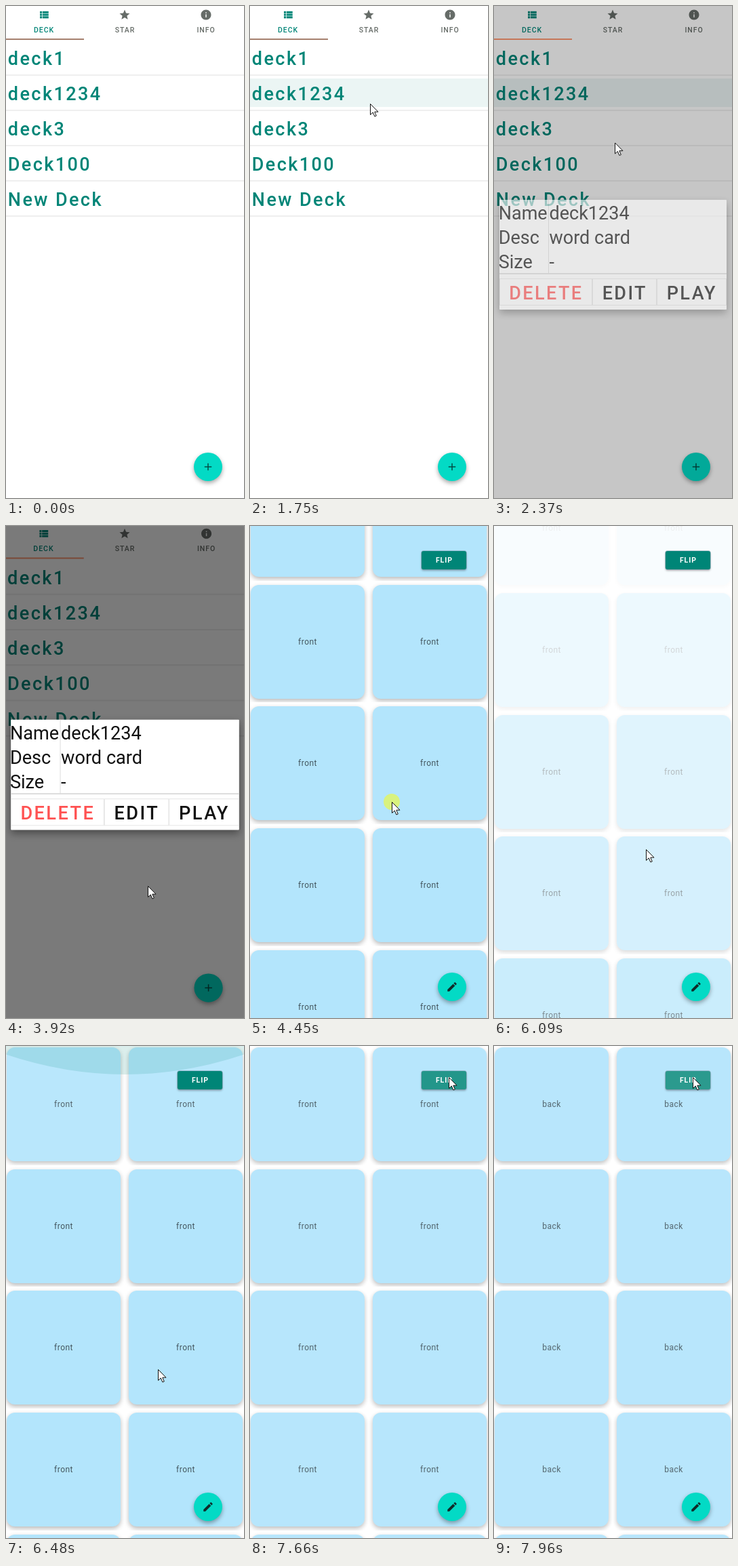
An HTML page for the animation above (8000 ms loop, 351 px wide and 726 px high).

```html
<!DOCTYPE html>
<html>
<head>
<meta charset="utf-8">
<style>
html, body { margin: 0; width: 100%; height: 100%; overflow: hidden; background: #fff; }
body { position: relative; font-family: Roboto, sans-serif; }
div, svg, span { position: absolute; white-space: nowrap; }
.page, .dim { left: 0; top: 0; width: 351px; height: 726px; background: #fff; overflow: hidden; }
.tab { top: 0; width: 120px; height: 50px; color: #666c68; }
.tab.on { color: #008577; }
.tab svg { left: 51px; top: 4px; width: 18px; height: 18px; fill: currentColor; }
.tab span { left: 0; width: 121px; top: 28px; text-align: center; font: 500 10.5px/15px Roboto, sans-serif; letter-spacing: .94px; }
.big { font: 500 27px/52px Roboto, sans-serif; letter-spacing: 2.41px; }
.deck { left: 0; width: 351px; height: 52px; color: #008577; text-indent: 2.8px; }
.deck::after { content: ""; position: absolute; left: 0; top: 49px; width: 100%; height: 1.5px; background: #efefef; }
#press { left: 0; top: 107px; width: 351px; height: 42px; background: #008577; }
#line { left: 0; top: 48.3px; width: 115px; height: 1.5px; }
.fab { left: 276.7px; top: 658.7px; width: 42px; height: 42px; border-radius: 50%; background: #03dac5; box-shadow: 0 3px 6px rgba(0,0,0,.35); }
.fab svg { left: 12px; top: 12px; width: 18px; height: 18px; }
.dim { background: #000; }
#dialog { left: 7.5px; top: 285.5px; width: 335px; height: 162px; background: #fff; border-radius: 1px; box-shadow: 0 5px 12px rgba(0,0,0,.4); }
#dialog .label { font: 27px/36.3px Roboto, sans-serif; color: #111; }
.rule { background: #dcdcdc; }
.btn { top: 116px; height: 40px; border: 1px solid #e6e6e6; box-sizing: border-box; line-height: 42px !important; text-indent: 13.7px; overflow: hidden; color: #111; }
#ripple { left: 47px; top: 20px; width: 0; height: 0; border-radius: 50%; background: #000; }
.cell { width: 180px; height: 179.67px; overflow: hidden; }
.card { left: 6px; top: 6px; width: 168px; height: 168px; border-radius: 12px; background: #b3e5fc; box-shadow: 0 3px 7px rgba(0,0,0,.28); }
.card span { left: 0; width: 100%; text-align: center; font: 12px/168px Roboto, sans-serif; letter-spacing: .45px; color: rgba(0,0,0,.63); }
#flip { left: 253px; top: 37px; width: 66px; height: 27px; border-radius: 3px; background: #008577; color: #fff; text-align: center; text-indent: .9px; font: 700 10.5px/27px Roboto, sans-serif; letter-spacing: .94px; box-shadow: 0 0 0 .8px rgba(120,150,165,.7), 0 2px 3px rgba(0,0,0,.3); overflow: hidden; }
#flash { left: 0; top: 0; width: 100%; height: 100%; background: #fff; }
#glow { left: 0; top: 0; }
#halo { left: -12px; top: -12px; width: 24px; height: 24px; border-radius: 50%; background: rgba(255,255,0,.5); }
#cursor { left: 0; top: 0; }
</style>
</head>
<body>
<div class="page" id="list">
  <div id="press"></div>
  <div id="line"></div>
  <div class="fab"><svg viewBox="0 0 24 24" fill="#044f47"><path d="M19 13h-6v6h-2v-6H5v-2h6V5h2v6h6v2z"/></svg></div>
</div>
<div class="dim" id="dim"></div>
<div class="page" id="popup" style="background:none">
  <div id="dialog">
    <div class="rule" style="left:72px;top:0;width:1.5px;height:109px"></div>
    <div class="rule" style="left:0;top:108.5px;width:335px;height:1.5px"></div>
    <div class="btn big" style="left:0;width:137.5px;color:#ff5252">DELETE</div>
    <div class="btn big" style="left:137.5px;width:95px">EDIT<div id="ripple"></div></div>
    <div class="btn big" style="left:232.5px;width:102.5px">PLAY</div>
  </div>
</div>
<div class="page" id="cards">
  <div id="grid"></div>
  <svg id="glow" width="351" height="726"><path fill="#008577" fill-opacity=".14"/></svg>
  <div id="flip">FLIP<div id="flash"></div></div>
  <div class="fab"><svg viewBox="0 0 24 24" fill="#102c2a"><path d="M3 17.25V21h3.75L17.81 9.94l-3.75-3.75L3 17.25zM20.71 7.04c.39-.39.39-1.02 0-1.41l-2.34-2.34c-.39-.39-1.02-.39-1.41 0l-1.83 1.83 3.75 3.75 1.83-1.83z"/></svg></div>
</div>
<div id="cursor">
  <div id="halo"></div>
  <svg width="14" height="22"><path d="M.5 .5V16.5L4.3 13L6.9 19L9.3 18L6.8 12.2H12Z" fill="#fff" stroke="#111"/></svg>
</div>
<script>
const LOOP = 8000, PITCH = 179.67, ROWS = 16, FADE = 350;
const $ = id => document.getElementById(id);
const add = (parent, html) => parent.insertAdjacentHTML('beforeend', html);
const ramp = (t, a, b) => Math.min(1, Math.max(0, (t - a) / (b - a)));

// Interpolates rows of [time, ...values].
function track(keys, t) {
  let i = 0;
  while (i < keys.length - 2 && t >= keys[i + 1][0]) i++;
  const a = keys[i], b = keys[i + 1], p = ramp(t, a[0], b[0]);
  return a.slice(1).map((v, j) => v + (b[j + 1] - v) * p);
}

const tabs = [
  ['DECK', 'M4 14h4v-4H4v4zm0 5h4v-4H4v4zM4 9h4V5H4v4zm5 5h12v-4H9v4zm0 5h12v-4H9v4zM9 5v4h12V5H9z'],
  ['STAR', 'M12 17.27L18.18 21l-1.64-7.03L22 9.24l-7.19-.61L12 2 9.19 8.63 2 9.24l5.46 4.73L5.82 21z'],
  ['INFO', 'M12 2C6.48 2 2 6.48 2 12s4.48 10 10 10 10-4.48 10-10S17.52 2 12 2zm1 15h-2v-6h2v6zm0-8h-2V7h2v2z']
];
tabs.forEach(([name, d], i) => add($('list'),
  `<div class="tab ${i ? '' : 'on'}" style="left:${-4.5 + 119.5 * i}px"><svg viewBox="0 0 24 24"><path d="${d}"/></svg><span>${name}</span></div>`));
['deck1', 'deck1234', 'deck3', 'Deck100', 'New Deck'].forEach((name, i) =>
  add($('list'), `<div class="deck big" style="top:${52 + 52 * i}px">${name}</div>`));
[['Name', 'deck1234'], ['Desc', 'word card'], ['Size', '-']].forEach((pair, i) =>
  pair.forEach((s, j) => add($('dialog'),
    `<div class="label" style="left:${j ? 74 : -.8}px;top:${2 + 36.3 * i}px">${s}</div>`)));
for (let i = 0; i < ROWS * 2; i++)
  add($('grid'), `<div class="cell" style="left:${i % 2 ? 175 : -5}px;top:${-4 + PITCH * (i >> 1)}px">
    <div class="card"><span class="front">front</span><span class="back">back</span></div></div>`);
const cards = [...document.querySelectorAll('.card')];

const END = PITCH * 11 + 157.7;
const scrollKeys = [[4300, 0], [4440, 95], [4490, 95], [4540, 260], [5200, END], [5480, END], [5660, END - 215], [6220, 0]];
const cursorKeys = [
  [520, 304, 712], [760, 270, 500], [1000, 205, 240], [1220, 177, 144], [2060, 177, 144], [2370, 178, 201],
  [2830, 188, 416], [3370, 188, 416], [3850, 209, 531], [4150, 209, 531], [4270, 209, 508], [4440, 209, 407],
  [4490, 209, 407], [4540, 206, 300], [5000, 204, 350], [5310, 202, 388], [5470, 206, 265], [5660, 224, 477],
  [6490, 224, 477], [6710, 174, 295], [6960, 253, 12], [7120, 273, 16], [7360, 279, 67], [7580, 293, 46], [LOOP, 293, 46]
];
const scroll = t => track(scrollKeys, t)[0];

// A row fades in from the moment it enters the view.
function rowAlpha(row, t) {
  let age = 0;
  for (; age < FADE; age += 10) {
    const top = -4 + PITCH * row - scroll(t - age);
    if (top > 726 || top + PITCH < 0) break;
  }
  return age / FADE;
}

function edgeGlow(t) {
  const size = hit => ramp(t, hit, hit + 130) * (1 - ramp(t, hit + 280, hit + 560));
  const bottom = size(5200), top = size(6220), h = bottom ? 36 * bottom : 42 * top;
  if (!h) return '';
  const side = h * .3, ctrl = h * 1.7;
  return bottom ? `M0 726V${726 - side}Q175.5 ${726 - ctrl} 351 ${726 - side}V726Z`
                : `M0 0V${side}Q175.5 ${ctrl} 351 ${side}V0Z`;
}

function drawList(t) {
  const show = ramp(t, 2280, 2490), open = 1 - (1 - ramp(t, 3895, 4150)) ** 2;
  $('list').style.transform = $('popup').style.transform = `scale(${1 + .025 * open})`;
  $('press').style.opacity = t < 1750 ? 0 : .08 * (1 - ramp(t, 2450, 2800));
  $('line').style.background = t < 2060 ? '#a5806e' : '#ff9873';
  $('dim').style.opacity = .52 * show;
  $('dialog').style.opacity = 1 - (1 - show) ** 1.7;
  const r = 52 * ramp(t, 2860, 3140);
  $('ripple').style.boxShadow = `0 0 0 ${r}px #000`;
  $('ripple').style.opacity = .12 * (1 - ramp(t, 3370, 3600));
}

function drawCards(t) {
  const open = 1 - (1 - ramp(t, 3895, 4150)) ** 2, page = $('cards').style;
  page.opacity = ramp(t, 3930, 4020);
  page.transform = `scale(${.88 + .12 * open})`;
  $('grid').style.transform = `translateY(${-scroll(t)}px)`;
  const turn = ramp(t, 7640, 7988);
  cards.forEach((card, i) => {
    card.style.opacity = rowAlpha(i >> 1, t) * (1 - turn * (1 - turn));
    card.children[0].style.opacity = 1 - turn;
    card.children[1].style.opacity = turn;
  });
  $('glow').firstChild.setAttribute('d', edgeGlow(t));
  $('flash').style.opacity = .17 * ramp(t, 7580, 7680);
}

function drawCursor(t) {
  const [x, y] = track(cursorKeys, t);
  $('cursor').style.transform = `translate(${x}px,${y}px)`;
  $('cursor').style.visibility = t < 520 || (t >= 6960 && t < 7120) ? 'hidden' : 'visible';
  $('halo').style.opacity = (t > 4260 && t < 4540) || (t > 5470 && t < 5660) ? 1 : 0;
}

function frame() {
  const t = performance.now() % LOOP;
  drawList(t);
  drawCards(t);
  drawCursor(t);
  requestAnimationFrame(frame);
}
frame();
</script>
</body>
</html>
```
